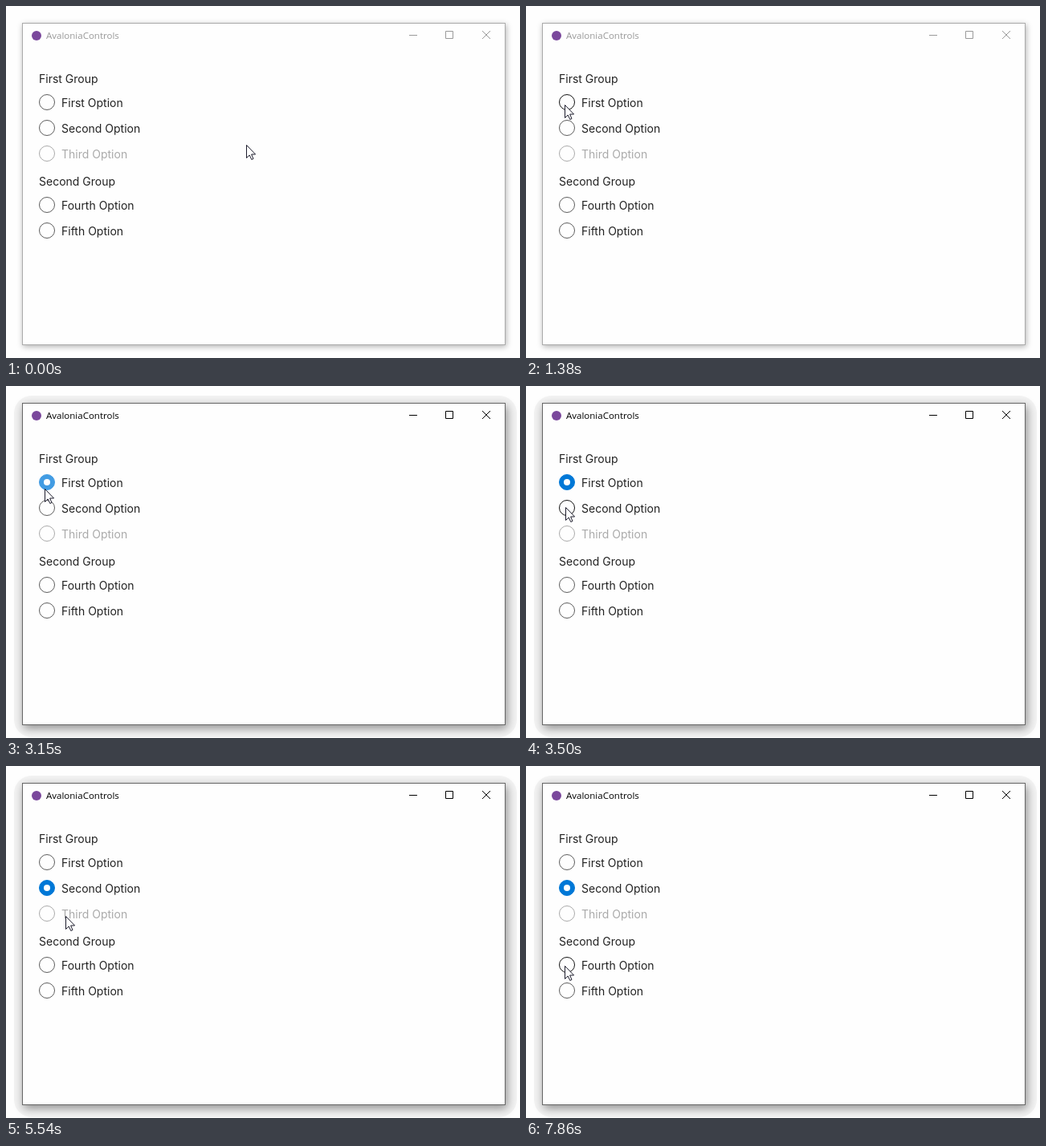
Write an HTML page that moves like this. It is 640 px wide and 439 px high and loops after 8000 ms.

```html
<!DOCTYPE html>
<html lang="en">
<head>
<meta charset="utf-8">
<title>Radio buttons</title>
<style>
  html, body { margin: 0; width: 100%; height: 100%; overflow: hidden; background: #fefefe; }
  #halo, #frame, svg { position: absolute; box-sizing: border-box; }
  #halo { left: 10px; top: 12px; width: 626px; height: 426px; border-radius: 22px; }
  #frame {
    left: 20px; top: 21px; width: 602px; height: 402px;
    background: #fefefe; border: 1px solid #aaa; box-shadow: 1px 2px 7px rgba(0, 0, 0, .3);
  }
  svg { left: 0; top: 0; }
  text { font: 14px Inter, sans-serif; fill: #222; }
  #chrome { stroke: #999; fill: none; }
  #title { font: 11.5px "Open Sans", sans-serif; fill: #999; }
  .ring { fill: none; stroke: #5c5c5c; }
  .dot { fill: #fff; visibility: hidden; }
  .hover .ring { stroke: #111; }
  .pressed .ring { stroke: #777; }
  .checked .ring { fill: #0078d7; stroke: #0078d7; }
  .checked.hover .ring { fill: #429ce3; stroke: #429ce3; }
  .checked .dot { visibility: visible; }
  .disabled .ring { stroke: #aaa; }
  .disabled text { fill: #aaa; }
  .active #halo { background: #f3f3f3; }
  .active #frame { border-color: #666; box-shadow: 2px 4px 11px rgba(0, 0, 0, .42); }
  .active #chrome { stroke: #000; }
  .active #title { fill: #000; }
</style>
</head>
<body>
<div id="halo"></div>
<div id="frame"></div>
<svg width="640" height="439" viewBox="0 0 640 439">
  <circle cx="38" cy="37" r="6" fill="#7a489c"/>
  <text id="title" x="50" y="41">AvaloniaControls</text>
  <path id="chrome" d="M502 36.5h10M547.5 31.5h9v9h-9zM593 31l10 10M603 31l-10 10"/>
  <text x="41" y="96">First Group</text>
  <text x="41" y="224">Second Group</text>
  <g id="options"></g>
  <path id="cursor" d="M.5.5V16.5L4.2 13 6.8 18.5 9 17.5 6.6 12H11.6Z" fill="#fff" stroke="#1c1c2c"/>
</svg>
<script>
const LOOP = 8000;
const options = [['First', 120], ['Second', 152], ['Third', 184], ['Fourth', 248], ['Fifth', 280]];
const clicks = [{ down: 2090, up: 2220, option: 0 }, { down: 4250, up: 4360, option: 1 }];

// Each move advances in equal time steps along evenly spaced waypoints.
const moves = [
  { start: 560, end: 1310, steps: 14, path: [[299, 173], [210, 112], [158, 95], [125, 92], [97, 97], [72, 109], [56, 118], [50, 123]] },
  { start: 1380, end: 1380, steps: 1, path: [[50, 123], [48, 123]] },
  { start: 3150, end: 3500, steps: 7, path: [[48, 123], [48, 128], [48, 133], [48, 138], [49, 143], [49, 147], [49, 150], [49, 151]] },
  { start: 5240, end: 5540, steps: 5, path: [[49, 151], [52, 156], [59, 167], [67, 178], [72, 185], [74, 187]] },
  { start: 7120, end: 7520, steps: 8, path: [[74, 187], [70, 197], [60, 221], [51, 242], [48, 250]] },
  { start: 7860, end: 7860, steps: 1, path: [[48, 250], [48, 249]] }
];

const $ = id => document.getElementById(id);
$('options').innerHTML = options.map(([name, y]) => `<g>
  <circle class="ring" cx="51" cy="${y}" r="9.5"/>
  <circle class="dot" cx="51" cy="${y}" r="4"/>
  <text x="69" y="${y + 6}">${name} Option</text></g>`).join('');
const groups = [...$('options').children];

function cursorAt(t) {
  const move = moves.filter(m => t >= m.start).pop();
  if (!move) return moves[0].path[0];
  const { start, end, steps, path } = move;
  const interval = (end - start) / (steps - 1 || 1) || 1;
  const step = Math.min(steps, Math.floor((t - start + 4) / interval) + 1);
  const at = step / steps * (path.length - 1);
  const i = Math.min(Math.floor(at), path.length - 2);
  return path[i].map((v, axis) => Math.round(v + (path[i + 1][axis] - v) * (at - i)));
}

function render(t) {
  const [x, y] = cursorAt(t);
  const press = clicks.find(c => t >= c.down && t < c.up);
  const chosen = clicks.filter(c => t >= c.up).pop();
  $('cursor').setAttribute('transform', `translate(${x} ${y})`);
  document.body.className = t >= clicks[0].down ? 'active' : '';
  groups.forEach((group, i) => {
    const centre = options[i][1];
    const state = {
      hover: x < 170 && y >= centre - 16 && y < centre + 16,
      pressed: press?.option === i,
      checked: chosen?.option === i,
      disabled: i === 2
    };
    group.setAttribute('class', Object.keys(state).filter(key => state[key]).join(' '));
  });
}

const began = performance.now();
(function tick() {
  render((performance.now() - began) % LOOP);
  requestAnimationFrame(tick);
})();
</script>
</body>
</html>
```
